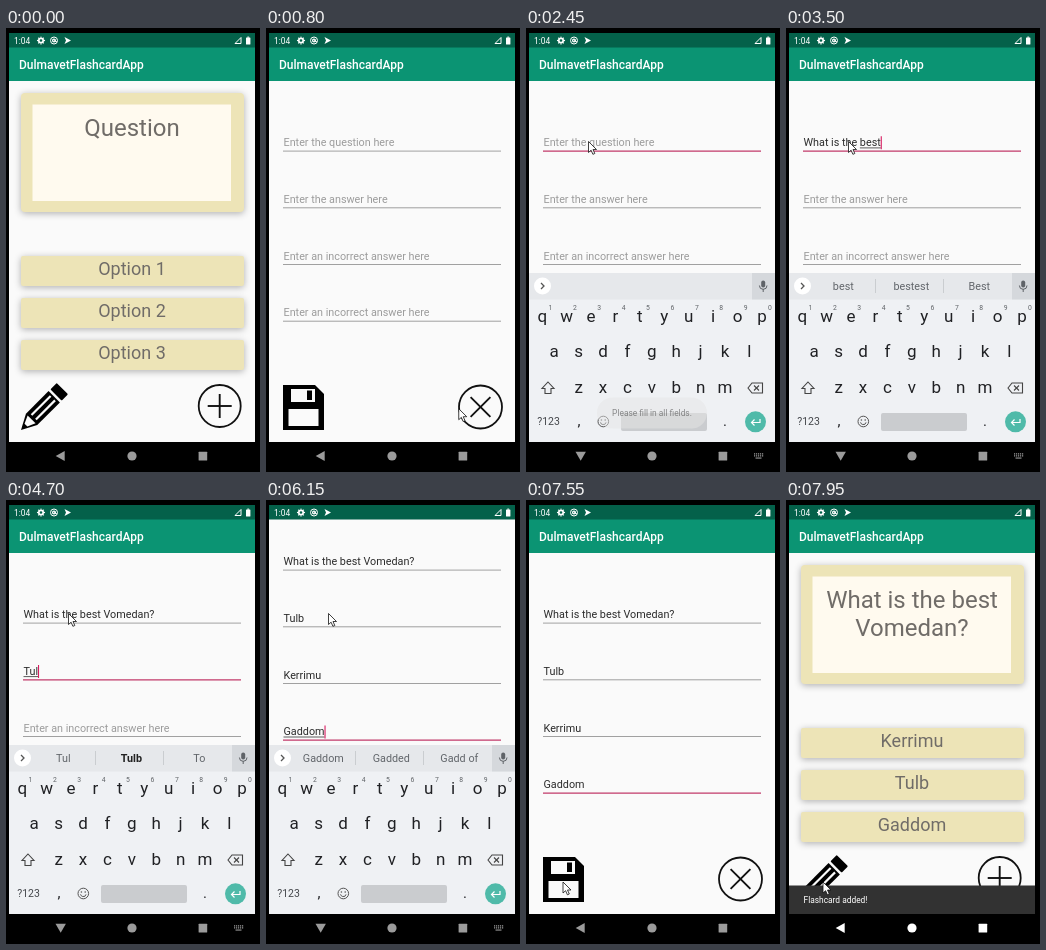
An HTML page with a canvas that plays this animation: 254 px wide and 444 px high, repeating every 8 s.

```html
<!DOCTYPE html>
<html lang="en">
<head>
<meta charset="utf-8">
<title>Flashcard app</title>
<style>
html, body { margin: 0; width: 100%; height: 100%; overflow: hidden; background: #000; }
canvas { display: block; width: 100vw; height: 100vh; }
</style>
</head>
<body>
<canvas></canvas>
<script>
const W = 254, H = 444, LOOP = 8000;
const canvas = document.querySelector('canvas');
const c = canvas.getContext('2d');
const ratio = Math.max(1, window.devicePixelRatio || 1);
canvas.width = W * ratio;
canvas.height = H * ratio;

const INK = '#202124', GREY = '#706c68', PAPER = '#fafafa';
const hints = ['Enter the question here', 'Enter the answer here',
  'Enter an incorrect answer here', 'Enter an incorrect answer here'];
// When each field gets focus, when typing starts, and ms per letter
const entries = [
  { text: 'What is the best Vomedan?', focus: 1950, start: 2580, step: 60 },
  { text: 'Tulb', focus: 4200, start: 4440, step: 120 },
  { text: 'Kerrimu', focus: 4900, start: 5020, step: 75 },
  { text: 'Gaddom', focus: 5530, start: 5700, step: 70 }
];
const suggestions = {
  best: ['best', 'bestest', 'Best'],
  Tul: ['Tul', 'Tulb', 'To'],
  Gaddom: ['Gaddom', 'Gadded', 'Gadd of']
};
const pointer = [[100, 256, 300], [350, 216, 382], [700, 216, 382], [1150, 35, 372],
  [1600, 35, 372], [1850, 62.5, 113.5], [6450, 62.5, 113.5], [6950, 56, 425],
  [7150, 56, 425], [7450, 37, 382], [8000, 37, 382]];

const mix = (a, b, k) => a + (b - a) * k;
function ease(t, from, to) {
  const k = Math.min(1, Math.max(0, (t - from) / (to - from)));
  return k * k * (3 - 2 * k);
}

function box(x, y, w, h, color, radius = 0) {
  c.fillStyle = color;
  c.beginPath();
  c.roundRect(x, y, w, h, radius);
  c.fill();
}
function shape(points, color) {
  c.fillStyle = color;
  c.beginPath();
  points.forEach(p => c.lineTo(...p));
  c.closePath();
  c.fill();
}
function line(points, color, width = 1, closed = false) {
  c.strokeStyle = color;
  c.lineWidth = width;
  c.beginPath();
  points.forEach(p => c.lineTo(...p));
  if (closed) c.closePath();
  c.stroke();
}
function disc(x, y, r, color) {
  c.fillStyle = color;
  c.beginPath();
  c.arc(x, y, r, 0, 7);
  c.fill();
}
function ring(x, y, r, color, width, from = 0, to = 2 * Math.PI) {
  c.strokeStyle = color;
  c.lineWidth = width;
  c.beginPath();
  c.arc(x, y, r, from, to);
  c.stroke();
}
function text(s, x, y, size, color, align = 'left', weight = 400) {
  c.font = `${weight} ${size}px Roboto, sans-serif`;
  c.textAlign = align;
  c.fillStyle = color;
  c.fillText(s, x, y);
}
function group(draw, alpha = 1, dx = 0, dy = 0) {
  c.save();
  c.globalAlpha *= alpha;
  c.translate(dx, dy);
  draw();
  c.restore();
}
function clip(x, y, w, h) {
  c.beginPath();
  c.rect(x, y, w, h);
  c.clip();
}

function statusBar() {
  box(3, 5, 246, 14.5, '#04614a');
  text('1:04', 8, 16, 8.4, '#fff');
  ring(35, 12.5, 2.2, '#fff', 1.7);
  for (let i = 0; i < 8; i++) {
    const a = i * Math.PI / 4;
    disc(35 + 3.4 * Math.cos(a), 12.5 + 3.4 * Math.sin(a), .7, '#fff');
  }
  ring(48, 12.5, 3.5, '#fff', 1);
  ring(48, 12.5, 1.4, '#fff', 1.3);
  line([[48, 12.5], [51, 14]], '#fff', 1);
  shape([[58.5, 9], [65, 12.5], [58.5, 16], [60, 12.5]], '#fff');
  line([[229, 15.5], [235, 15.5], [235, 9.5]], '#fff', 1, true);
  box(240, 9.5, 4.4, 7, '#fff', .6);
  box(241.3, 8.6, 1.8, 1, '#fff');
}

function appBar() {
  box(3, 19, 246, 34, '#0b9473');
  text('DulmavetFlashcardApp', 13, 40.6, 12, '#fff', 'left', 500);
}

function card(x, y, w, h, radius) {
  c.save();
  c.shadowColor = 'rgba(0,0,0,.3)';
  c.shadowBlur = 7 * ratio;
  c.shadowOffsetY = 1.5 * ratio;
  box(x, y, w, h, '#ede4b7', radius);
  c.restore();
}

function pencil() {
  c.save();
  c.translate(15, 402);
  c.rotate(-Math.PI / 4);
  shape([[0, 0], [15, -8], [47, -8], [47, 8], [15, 8]], '#000');
  shape([[7, -2], [15, -5.6], [15, 5.6], [7, 2]], PAPER);
  box(18, -4.2, 27, 2.2, PAPER);
  box(18, 2, 27, 2.2, PAPER);
  box(49.5, -8, 9, 16, '#000', 1);
  c.restore();
}

function roundButton(x, y, r, arm, turn) {
  ring(x, y, r, '#111', 1.8);
  c.save();
  c.translate(x, y);
  c.rotate(turn);
  line([[-arm, 0], [arm, 0]], '#111', 1.9);
  line([[0, -arm], [0, arm]], '#111', 1.9);
  c.restore();
}

function floppy() {
  shape([[17, 357], [49, 357], [58, 366], [58, 402], [17, 402]], '#000');
  box(25, 361, 24, 13, PAPER);
  box(41, 362.5, 5, 9.5, '#000');
  box(22.5, 381, 30, 17, PAPER);
}

function homeScreen(saved) {
  box(3, 5, 246, 409, PAPER);
  appBar();
  card(15, 65, 223, 119, 4);
  box(26.5, 76.5, 198.5, 96.5, '#fffaef');
  const question = saved ? ['What is the best', 'Vomedan?'] : ['Question'];
  question.forEach((s, i) => text(s, 126, 108 + 28 * i, 24, GREY, 'center'));
  const options = saved ? [2, 1, 3].map(i => entries[i].text)
    : ['Option 1', 'Option 2', 'Option 3'];
  options.forEach((s, i) => {
    card(15, 228 + 42 * i, 223, 30, 2);
    text(s, 126, 247.3 + 42 * i, 18, GREY, 'center');
  });
  pencil();
  roundButton(213.7, 378, 21, 12, 0);
}

const typedCount = (e, t) =>
  t < e.start ? 0 : Math.min(e.text.length, Math.floor((t - e.start) / e.step) + 1);

function field(i, t, active) {
  const e = entries[i], y = 118.3 + 56.7 * i;
  const typed = e.text.slice(0, typedCount(e, t));
  text(typed || hints[i], 17.5, y, 10.8, typed ? '#2c2c2c' : '#9c9c9c');
  line([[17, y + 4.8], [235, y + 4.8]], active ? '#c23a6a' : '#8a8a8a', active ? 1.3 : .8);
  if (!active) return;
  const end = 17.5 + (typed ? c.measureText(typed).width : 0);
  const word = typed.match(/\w*$/)[0];
  if (word && t < 6900) {
    const from = end - c.measureText(word).width;
    line([[from, y + 1.6], [end, y + 1.6]], '#333', .8);
  }
  const lastKey = typed ? e.start + e.step * (typed.length - 1) : e.focus;
  if (Math.floor((t - lastKey) / 500) % 2 === 0)
    line([[end + .5, y - 10], [end + .5, y + 3]], '#d81b60', 1.1);
}

function formScreen(t, focus) {
  box(3, 5, 246, 409, PAPER);
  const pan = 53 * (ease(t, 5550, 5700) - ease(t, 7150, 7300));
  group(() => {
    appBar();
    hints.forEach((_, i) => field(i, t, i === focus));
  }, 1, 0, -pan);
  floppy();
  roundButton(214.5, 379, 21.5, 14, Math.PI / 4);
}

function toast() {
  box(71, 369.5, 110, 31, '#e4e4e4', 15.5);
  text('Please fill in all fields.', 126, 388, 8.4, '#222', 'center');
}

function suggestionBar(t, focus) {
  box(3, 245, 246, 26.5, '#e6e8eb');
  box(226, 245, 23, 26.5, '#d5d8dc');
  disc(16.5, 258, 8.5, '#fff');
  line([[15, 255], [18, 258], [15, 261]], '#555', 1.3);
  box(235.2, 252.5, 4, 7, '#5f6368', 2);
  ring(237.2, 257.5, 3.8, '#5f6368', 1, 0, Math.PI);
  line([[237.2, 261], [237.2, 264]], '#5f6368');
  const e = entries[focus];
  const word = e && t < 6900 ? e.text.slice(0, typedCount(e, t)).match(/\w*$/)[0] : '';
  if (!word) return;
  const list = suggestions[word] || [word, word + 's', word + 'er'];
  list.forEach((s, i) => {
    const bold = word === 'Tul' && i === 1;
    text(s, 57.3 + 68 * i, 262, 10.8, bold ? '#222' : '#62666b', 'center', bold ? 700 : 400);
  });
  [89.5, 157.5].forEach(x => line([[x, 251], [x, 265]], '#c3c6ca', .8));
}

function keyboard(t, focus) {
  box(3, 271, 246, 143, '#eff1f4');
  suggestionBar(t, focus);
  [['qwertyuiop', 16.3, 293.5], ['asdfghjkl', 28.2, 329], ['zxcvbnm', 52.6, 364.6]]
    .forEach(([row, x, y]) => [...row].forEach((key, i) =>
      text(key, x + 24.4 * i, y, 17, INK, 'center')));
  for (let i = 0; i < 10; i++)
    text((i + 1) % 10, 24.4 + 24.4 * i, 281.8, 6.8, '#606468', 'center');

  line([[22, 354], [28, 360.5], [25, 360.5], [25, 365.5], [19, 365.5], [19, 360.5], [16, 360.5]],
    '#444', 1.1, true);
  line([[222, 360], [226, 355], [236.5, 355], [236.5, 365], [226, 365]], '#444', 1.1, true);
  line([[228, 357.5], [233, 362.5]], '#444', 1.1);
  line([[233, 357.5], [228, 362.5]], '#444', 1.1);

  text('?123', 22.5, 397.3, 10.5, '#44474b', 'center');
  text(',', 53, 398, 15, INK, 'center');
  ring(77.3, 393.5, 5.3, '#555', 1);
  disc(75.4, 392, .8, '#555');
  disc(79.2, 392, .8, '#555');
  ring(77.3, 393.8, 2.8, '#555', 1, .2, Math.PI - .2);
  box(95, 385, 86, 18, '#cacccf', 2);
  text('.', 199, 398, 15, INK, 'center');
  disc(229.5, 393.8, 10.5, '#4fbaa9');
  line([[234, 391], [234, 394.5], [225.5, 394.5]], '#fff', 1.2);
  line([[228.5, 391.5], [225.5, 394.5], [228.5, 397.5]], '#fff', 1.2);
}

function snackbar() {
  box(3, 385.5, 246, 29, '#323232');
  text('Flashcard added!', 17.5, 402.8, 8.4, '#fff');
}

function navBar(t, keyboardUp) {
  const color = t > 7700 ? '#fff' : '#9b9b9b';
  const press = ease(t, 6990, 7080) * (1 - ease(t, 7180, 7350));
  if (press) group(() => box(26, 415.5, 57, 25, '#2b2b2b', 12.5), press);
  shape(keyboardUp ? [[49.5, 423.7], [59.9, 423.7], [54.7, 432.7]]
    : [[58.7, 423], [58.7, 433], [49.7, 428]], color);
  disc(126, 428, 4.6, color);
  box(192.6, 423.8, 8.6, 8.6, color, .5);
  if (!keyboardUp) return;
  for (let row = 0; row < 2; row++)
    for (let i = 0; i < 5; i++) box(228 + 2 * i, 425.3 + 2 * row, 1.2, 1.2, color);
  box(229.5, 429.5, 6, 1.1, color);
}

function drawPointer(t) {
  if (t < pointer[0][0]) return;
  const i = Math.max(1, pointer.findIndex(p => p[0] > t));
  const a = pointer[i - 1], b = pointer[i], k = ease(t, a[0], b[0]);
  group(() => {
    const arrow = [[0, 0], [0, 11], [2.6, 8.7], [4.4, 12.8], [6.3, 12], [4.5, 8], [8, 8]];
    shape(arrow, '#fff');
    line(arrow, '#111', .8, true);
  }, 1, mix(a[1], b[1], k), mix(a[2], b[2], k));
}

function draw(t) {
  c.setTransform(canvas.width / W, 0, 0, canvas.height / H, 0, 0);
  box(0, 0, W, H, '#000');
  const focus = entries.filter(e => t >= e.focus).length - 1;
  const keys = ease(t, 2000, 2250) - ease(t, 7150, 7300);
  const open = ease(t, 420, 650), close = ease(t, 7550, 7700);

  c.save();
  clip(3, 5, 246, 409);
  if (open < 1 || close > 0) homeScreen(t > 4000);
  if (open > 0 && close < 1)
    group(() => formScreen(t, focus), open * (1 - close), 0, 30 * (1 - open + close));
  if (keys > 0) group(() => keyboard(t, focus), 1, 0, 170 * (1 - keys));
  const toastAlpha = ease(t, 1395, 1595) * (1 - ease(t, 2350, 2550));
  if (toastAlpha) group(toast, toastAlpha);
  if (t > 7720) group(snackbar, 1, 0, 30 * (1 - ease(t, 7720, 7900)));
  statusBar();
  c.restore();

  navBar(t, t >= 2000 && t < 7150);
  drawPointer(t);
}

const began = performance.now();
function tick() {
  draw((performance.now() - began) % LOOP);
  requestAnimationFrame(tick);
}
tick();
</script>
</body>
</html>
```
